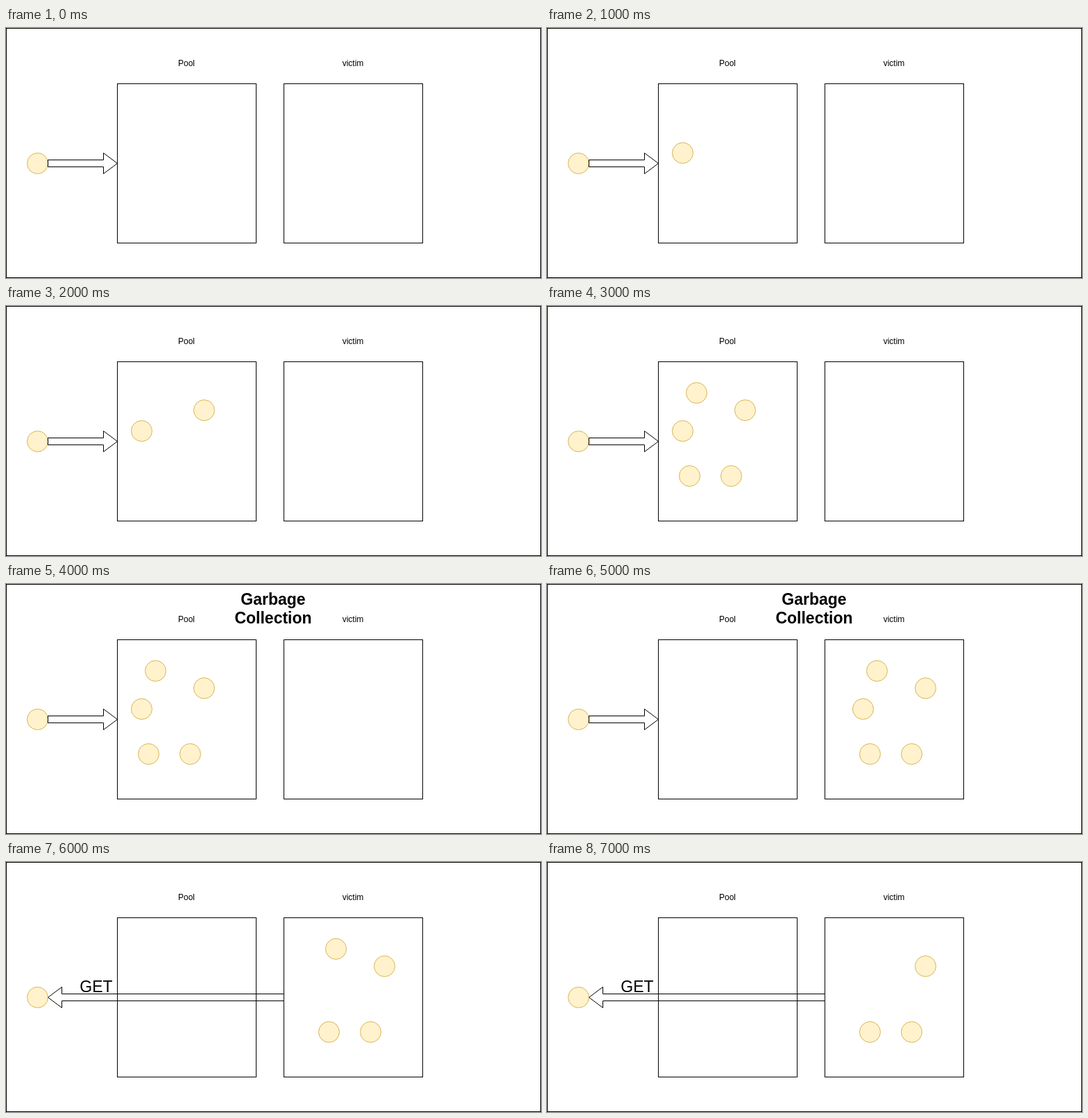
Animation of 771 by 361 pixels, one loop 8000 ms. Source, as an HTML page:

```html
<!DOCTYPE html>
<html lang="en">
<meta charset="utf-8">
<title>Pool garbage collection</title>
<style>
  html, body { margin: 0; height: 100%; overflow: hidden; background: #fff; }
  svg { display: block; }
  .line { fill: none; stroke: #000; }
  .ball { fill: #fff2cc; stroke: #d6b656; }
  text { font: 12px "Liberation Sans", Arial, sans-serif; text-anchor: middle; }
  .get { font-size: 23px; }
  .title { font-size: 23px; font-weight: bold; }
</style>
<svg width="771" height="361" viewBox="-.5 -.5 771 361">
  <rect class="line" width="770" height="360"/>
  <rect class="line" x="160" y="80" width="200" height="230"/>
  <rect class="line" x="400" y="80" width="200" height="230"/>
  <text x="259.5" y="54.5">Pool</text>
  <text x="499.5" y="54.5">victim</text>
  <circle class="ball" cx="45" cy="195" r="15"/>
  <path class="line" data-from="0" data-to="6" d="M60 190H140V180L160 195L140 210V200H60Z"/>
  <g data-from="6" data-to="8">
    <path class="line" d="M400 190H80V180L60 195L80 210V200H400Z"/>
    <text class="get" x="129.5" y="187.5">GET</text>
  </g>
  <g data-from="4" data-to="6">
    <text class="title" x="384.5" y="29.5">Garbage</text>
    <text class="title" x="384.5" y="56.5">Collection</text>
  </g>
  <g id="balls"></g>
</svg>
<script>
  const PERIOD = 8, COLLECT = 5, SHIFT = 260;
  // x, y in the pool, second added, second taken from the victim box
  const items = [
    [195, 180, 1, 6],
    [285, 150, 2, 8],
    [215, 125, 3, 7],
    [205, 245, 3, 8],
    [265, 245, 3, 8],
  ];
  const ball = (x, y, from, to) =>
    `<circle class="ball" cx="${x}" cy="${y}" r="15" data-from="${from}" data-to="${to}"/>`;

  document.getElementById('balls').innerHTML = items.map(([x, y, added, taken]) =>
    ball(x, y, added, COLLECT) + ball(x + SHIFT, y, COLLECT, taken)).join('');

  const timed = document.querySelectorAll('[data-from]');
  function draw() {
    const t = performance.now() / 1000 % PERIOD;
    for (const el of timed) {
      const shown = t >= +el.dataset.from && t < +el.dataset.to;
      el.style.display = shown ? '' : 'none';
    }
    requestAnimationFrame(draw);
  }
  draw();
</script>
</html>
```
